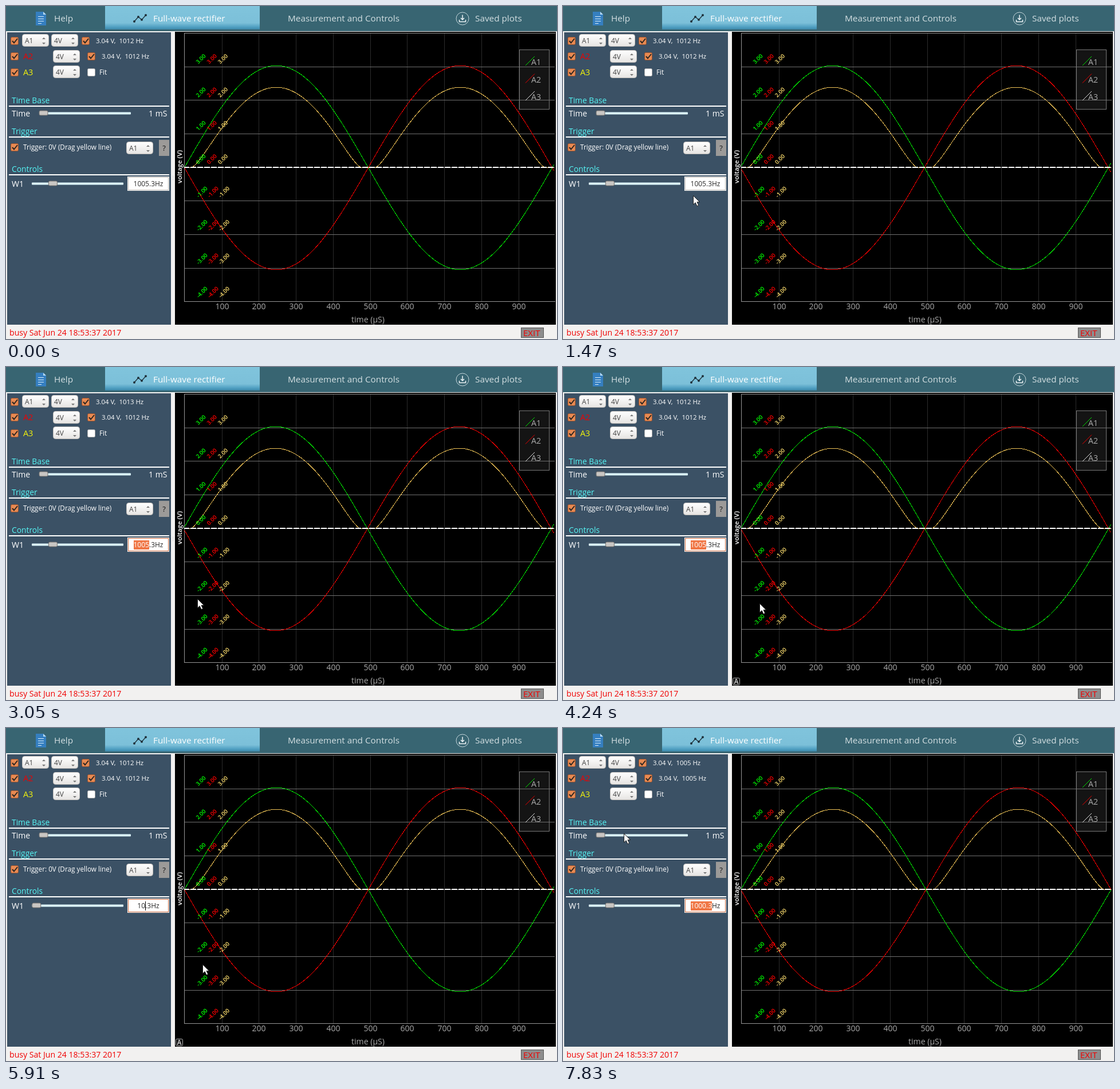
An HTML page for the animation above (8000 ms loop, 962x582 px).

```html
<!DOCTYPE html>
<html lang="en">
<head>
<meta charset="utf-8">
<title>Full-wave rectifier</title>
<style>
  html, body { margin: 0; width: 100%; height: 100%; overflow: hidden; background: #f2f1f0; }
  body { position: relative; }
  svg { position: absolute; left: 0; top: 0; display: block; }
  svg, #field { font-family: "Open Sans", "Noto Sans", sans-serif; }
  text { white-space: pre; }
  .crisp { shape-rendering: crispEdges; }
  .trace { fill: none; stroke-width: 1; shape-rendering: crispEdges; }
  #field {
    position: absolute; left: 212px; top: 298px; width: 73px; height: 25px;
    box-sizing: border-box; border: 1px solid #fff; background: #fff;
    font-size: 12px; line-height: 16px; color: #2c2c2c;
    display: flex; align-items: center; justify-content: center; white-space: pre;
    box-shadow: inset 0 0 0 1px #bdb9b4;
  }
  #field.focus { box-shadow: inset 0 0 0 1px #c9673b; }
  #field mark { background: #f07746; color: #fff; }
  #field i { width: 1px; height: 16px; margin-right: -1px; background: #000; z-index: 1; }
</style>
</head>
<body>
<svg id="stage" width="962" height="582" viewBox="0 0 962 582">
  <defs>
    <linearGradient id="tab" x2="0" y2="1">
      <stop offset="0" stop-color="#80c4dc"/><stop offset=".72" stop-color="#7cc0d9"/>
      <stop offset=".9" stop-color="#4f9fc1"/><stop offset="1" stop-color="#3d87a8"/>
    </linearGradient>
    <linearGradient id="button" x2="0" y2="1">
      <stop offset="0" stop-color="#fff"/><stop offset="1" stop-color="#e6e4e2"/>
    </linearGradient>
    <clipPath id="plotClip"><rect x="311" y="47" width="647" height="470"/></clipPath>
  </defs>
  <rect width="962" height="582" fill="#f2f1f0"/>
  <rect width="962" height="44" fill="#386572"/>
  <rect x="173" width="270" height="41" fill="url(#tab)"/>
  <rect x="2" y="46" width="286" height="511" fill="#3b5165"/>
  <rect x="295" y="45" width="665" height="512"/>
  <g id="icons">
    <path d="M52 10h13l5 5v19H52z" fill="#357fc0"/>
    <path d="M65 10v5h5z" fill="#b8dcf5"/>
    <path d="M56 18.500h10M56 22.500h10M56 26.500h10M56 30.500h6" stroke="#d8ecfa"/>
    <path d="M224 27L231 19 237 24 244 16" fill="none" stroke="#20323c" stroke-width="1.300"/>
    <g fill="#20323c"><circle cx="224" cy="27" r="2"/><circle cx="231" cy="19" r="2"/><circle cx="237" cy="24" r="2"/><circle cx="244" cy="16" r="2"/></g>
    <circle cx="797" cy="22" r="11" fill="none" stroke="#c3d5da"/>
    <path d="M797 15.500v8M794 21l3 3 3-3M791.500 24v3.500h11V24" fill="none" stroke="#eef5f7" stroke-width="1.500"/>
    <path d="M291.500 297v8" stroke="#bbb" stroke-dasharray="1 2"/>
  </g>
  <g id="panel"></g>
  <g id="plot"></g>
  <g clip-path="url(#plotClip)">
    <g transform="translate(.5 .3)">
      <path id="a1" class="trace" stroke="#00e000"/>
      <path id="a2" class="trace" stroke="#f00000"/>
      <path id="a3" class="trace" stroke="#ecc055"/>
    </g>
    <path class="crisp" d="M310 282H958" stroke="#fff" stroke-width="2" stroke-dasharray="10 2"/>
  </g>
  <g id="labels"></g>
  <g id="auto">
    <rect x="296.500" y="543.500" width="12" height="12" rx="2" fill="#111" stroke="#aaa"/>
    <text x="302.500" y="554" font-size="12" font-weight="600" fill="#ddd" text-anchor="middle">A</text>
  </g>
</svg>
<div id="field"></div>
<svg width="962" height="582" viewBox="0 0 962 582">
  <path id="cursor" d="M.5.5V16l3.700-3.400 2.700 6 2.800-1.200-2.700-5.800H11.600z" fill="#fff" stroke="#222"/>
</svg>
<script>
const LOOP = 8000, ZERO = 282.2, VOLT = 58.67, LEFT = 311, RIGHT = 958;
const $ = id => document.getElementById(id);

function add(parent, tag, attrs, content) {
  const el = document.createElementNS('http://www.w3.org/2000/svg', tag);
  for (const k in attrs) el.setAttribute(k, attrs[k]);
  if (content !== undefined) el.textContent = content;
  return $(parent).appendChild(el);
}
const label = (parent, x, y, size, fill, content, more) =>
  add(parent, 'text', { x, y, 'font-size': size, fill, ...more }, content);
const box = (parent, x, y, width, height, fill, more) =>
  add(parent, 'rect', { x, y, width, height, fill, ...more });
const line = (parent, d, stroke, more) =>
  add(parent, 'path', { d, stroke, fill: 'none', class: 'crisp', ...more });

function checkbox(x, y, on = true) {
  box('panel', x - 6.5, y - 6.5, 13, 13, on ? '#e88a52' : '#fff', { rx: 2, stroke: on ? '#95512f' : '#aaa' });
  if (on) add('panel', 'path', { d: `M${x - 4} ${y}l3 3.5 6-7.5`, fill: 'none', stroke: '#2c2520', 'stroke-width': 2 });
}
function spinner(x, y, content) {
  box('panel', x + .5, y + .5, 46, 21, 'url(#button)', { rx: 4, stroke: '#c4c0bc' });
  label('panel', x + 5, y + 15.5, 12, '#444', content);
  add('panel', 'path', { d: `M${x + 35} ${y + 9}l3-3 3 3zM${x + 35} ${y + 15}l3 3 3-3z`, fill: '#777' });
}
function slider(x, y) {
  box('panel', x, y - 2, 160, 4, '#dcf5fb', { rx: 1 });
  return box('panel', x, y - 4.5, 15, 8, '#c9c6c3', { rx: 2, stroke: '#77736f' });
}

// Tabs and status bar
[[84, 'Help'], [257, 'Full-wave rectifier'], [492, 'Measurement and Controls'], [819, 'Saved plots']]
  .forEach(([x, s], i) => label('panel', x, 27, 15.3, i === 1 ? '#fff' : '#d3dfe2', s));
label('panel', 6, 576, 14.1, '#f00000', 'busy Sat Jun 24 18:53:37 2017');
box('panel', 899.5, 562.5, 39, 17, '#8d8d8d', { stroke: '#555' });
label('panel', 903, 576.5, 15, '#f00000', 'EXIT');

// Control panel
[[15, 61], [15, 88], [15, 116], [139, 61], [149, 88], [15, 247]].forEach(([x, y]) => checkbox(x, y));
checkbox(149, 116, false);
spinner(28, 49, 'A1');
[[79, 49], [82, 77], [82, 104]].forEach(([x, y]) => spinner(x, y, '4V'));
spinner(210, 237, 'A1');
label('panel', 30, 93, 14.4, '#f00000', 'A2');
label('panel', 30, 121, 14.4, '#f5f50a', 'A3');
label('panel', 163, 120, 11.8, '#fff', 'Fit');
const readout1 = label('panel', 157, 65, 11.4, '#fff', '');
const readout2 = label('panel', 167, 92, 11.4, '#fff', '');
[['Time Base', 169.5, 175], ['Trigger', 223.5, 229], ['Controls', 289.5, 295]].forEach(([s, y, rule]) => {
  label('panel', 10, y, 13.8, '#55f5f5', s);
  line('panel', `M5 ${rule}H285`, '#fff', { 'stroke-width': 2 });
});
label('panel', 10, 193, 14, '#fff', 'Time');
label('panel', 249, 193, 14, '#fff', '1 mS');
slider(58, 187.5);
label('panel', 30, 251, 11.75, '#fff', 'Trigger: 0V (Drag yellow line)');
box('panel', 267, 234, 18, 28, '#9c9a98');
label('panel', 276, 253, 13, '#111', '?', { 'text-anchor': 'middle' });
label('panel', 10, 316, 14, '#fff', 'W1');
const knob = slider(45, 310.5);

// Plot frame, grid and labels
for (let i = 1; i < 10; i++) {
  const x = Math.round(LEFT + .9 + i * 64.75) + .5;
  line('plot', `M${x} 47V517`, '#2b2b2b');
  label('labels', x, 530, 14, '#aaa', i * 100, { 'text-anchor': 'middle' });
}
for (let v = -3; v <= 3; v++) line('plot', `M311 ${Math.floor(ZERO - v * VOLT) + .5}H958`, '#707070');
line('plot', 'M958.5 47.5H311.5V516.5H958.5', '#969696');
['#00ff00', '#ff0000', '#ffe070'].forEach((fill, i) => {
  for (let v = -4; v <= 3; v++) {
    const x = 340 + i * 19.2 + (v < 0 ? 2 : 0), y = 267.5 - v * 58.4 - (v < 0 ? 1 : 0);
    label('labels', 0, 3.6, 9.8, fill, v.toFixed(2),
      { 'text-anchor': 'middle', 'font-weight': 600, transform: `translate(${x} ${y}) rotate(-45)` });
  }
});
label('labels', 603, 553, 14.1, '#aaa', 'time (µS)');
label('labels', 0, 0, 11.5, '#fff', 'voltage (V)', { 'font-weight': 600, transform: 'translate(307 310) rotate(-90)' });
box('labels', 896.5, 76.5, 52, 104, '#646464', { 'fill-opacity': .2, stroke: '#777' });
['#00e000', '#f00000', '#ddd'].forEach((stroke, i) => {
  const y = 104 + i * 30.5;
  add('labels', 'path', { d: `M907 ${y}l16-16`, stroke });
  label('labels', 917, y - 1, 14.2, '#aaa', 'A' + (i + 1));
});

// Field states: [from, markup, frequency]; | is the caret, [..] the selection
const edits = [
  [0, '1005.3Hz', 1005], [2480, '[1005].3Hz', 1005], [5650, '1|.3Hz', 1005], [5910, '10|.3Hz', 10],
  [6080, '100|.3Hz', 100], [6250, '1000|.3Hz', 1000], [6450, '|[1000.3]Hz', 1000], [7200, '[1000.3]Hz', 1000]
];
// Pointer path: [time, x, y]
const path = [
  [960, 285, 392], [1130, 232, 341], [1300, 227, 331], [1560, 227, 331], [1960, 236, 308], [2660, 236, 308],
  [3000, 334, 405], [3060, 334, 405], [3180, 343, 413], [7000, 343, 413], [7640, 106, 184], [8000, 106, 184]
];
const jitter = [0, -1, -.5, -1.3, .3, -.8, -1.5, 0, -.6, -1.5, -.2, -1];
const within = (t, a, b) => t >= a && t < b;
let shown = '';

function pointer(t) {
  const i = path.findIndex(p => p[0] > t);
  if (i < 1) return i ? path[path.length - 1].slice(1) : null;
  const [t0, x0, y0] = path[i - 1], [t1, x1, y1] = path[i];
  const k = (t - t0) / (t1 - t0), e = k * k * (3 - 2 * k);
  return [x0 + (x1 - x0) * e, y0 + (y1 - y0) * e].map(Math.round);
}

function rectified(a) {
  const g = Math.abs(a);
  return Math.max(0, g - 38 * (1 - Math.exp(-g / 25)));
}

function drawTraces(half, shift) {
  const wave = x => 3.04 * VOLT * Math.sin((x - LEFT - shift) / half * Math.PI);
  const trace = f => {
    let d = '';
    for (let x = LEFT; x <= RIGHT; x += 3) d += `${d ? 'L' : 'M'}${x} ${(ZERO - f(wave(x))).toFixed(1)}`;
    return d;
  };
  $('a1').setAttribute('d', trace(a => a));
  $('a2').setAttribute('d', trace(a => -a));
  $('a3').setAttribute('d', trace(rectified));
}

function draw(t) {
  const [, markup, frequency] = edits.filter(e => e[0] <= t).pop();
  const slow = t >= 6320;
  const sample = Math.max(0, Math.floor((t - 110) / 165.7) + 1);
  const state = markup + sample + slow;
  if (state !== shown) {
    shown = state;
    $('field').innerHTML = markup.replace('|', '<i></i>').replace('[', '<mark>').replace(']', '</mark>')
      .replace(/(^|>)([^<]+)/g, '$1<span>$2</span>');
    $('field').className = t >= 2480 ? 'focus' : '';
    drawTraces(slow ? 323.2 : 321, jitter[sample % jitter.length]);
  }
  const blip1 = within(t, 1765, 1930) || within(t, 2925, 3255) || within(t, 3920, 4085);
  const blip2 = within(t, 5080, 5245);
  const reading = blip => `3.04 V,\u00a0 ${slow ? 1005 : blip ? 1013 : 1012} Hz`;
  readout1.textContent = reading(blip1);
  readout2.textContent = reading(blip2);
  knob.setAttribute('x', 45.5 + frequency * .0288);
  $('auto').style.display = within(t, 3100, 7160) ? '' : 'none';
  const at = pointer(Math.floor(t / 30) * 30);
  $('cursor').style.display = at ? '' : 'none';
  if (at) $('cursor').setAttribute('transform', `translate(${at})`);
}

const start = performance.now();
function tick() {
  draw((performance.now() - start) % LOOP);
  requestAnimationFrame(tick);
}
tick();
</script>
</body>
</html>
```
